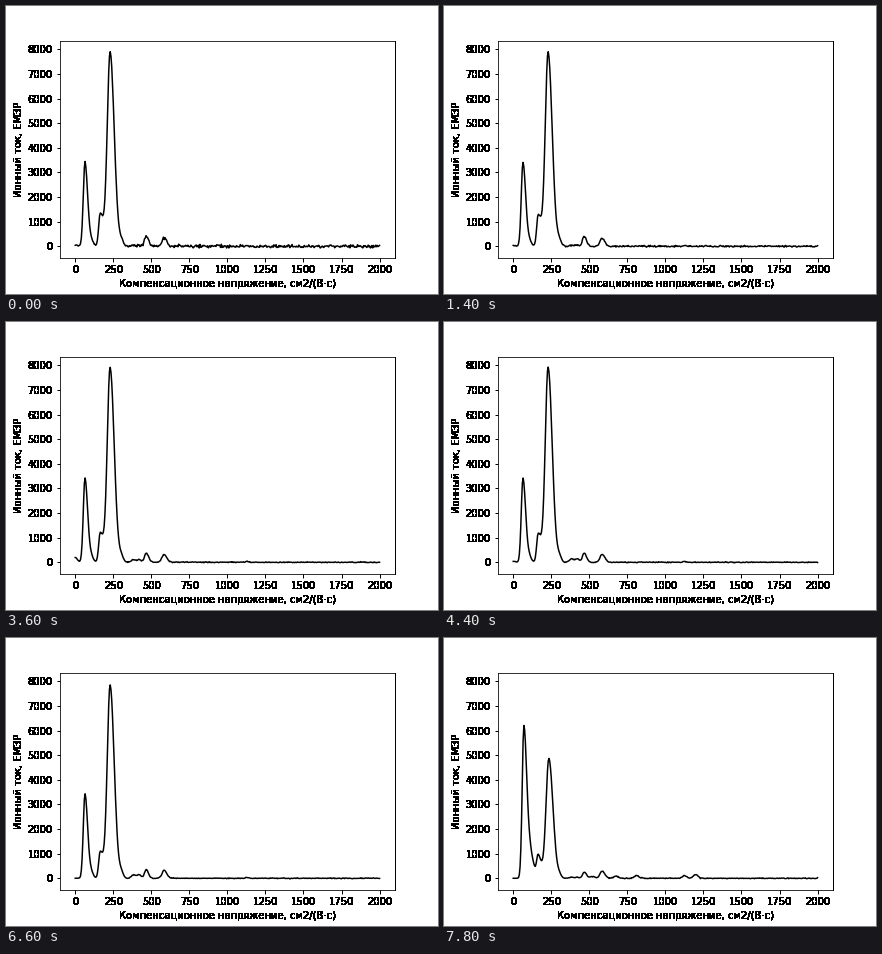
These frames come from a looping animation (432x288 px, 8 s). A matplotlib script:

```python
import numpy as np
import matplotlib.pyplot as plt
from matplotlib.animation import FuncAnimation

FRAMES, STEP = 40, 200
SWAP = 33  # the first peak starts to overtake the main one here

x = np.linspace(0, 2000, 401)


def bump(height, center, left, right=None):
    """Gaussian peak with separate widths on each side."""
    width = np.where(x < center, left, right or left)
    return height * np.exp(-0.5 * ((x - center) / width) ** 2)


def mix(a, b, s):
    return a + (b - a) * s


def pulse(i, center, width):
    return np.exp(-((i - center) / width) ** 2)


def spectrum(i):
    s = (max(i - SWAP, 0) / (FRAMES - 1 - SWAP)) ** 1.2
    main = 7890 - i + 70 * pulse(i, 21, 5)
    plateau = mix(45 + 95 / (1 + np.exp((17 - i) / 1.5)), 40, s)
    start = 55 * np.exp(-i / 15) + 180 * pulse(i, 18, 3)

    # first peak with its tail, then the shoulder of the main peak
    y = bump(mix(3420, 6200, s), mix(64, 70, s), 11, mix(17, 20, s))
    y += bump(mix(250, 850, s), mix(103, 115, s), 15, mix(15, 22, s))
    y += bump((1330 - 7.5 * i) * (1 - 0.12 * s), 164, 10, 21)
    y += bump(mix(main, 4870, s), mix(229, 234, s), 18.7, 27)
    y += bump(mix(220, 120, s), 303, 13)

    # small peaks
    y += bump(plateau, 384, 14) + bump(plateau, 421, 13)
    y += bump((430 - 2.2 * i) * (1 - 0.3 * s), 466, 11, 15)
    y += bump(mix(320, 290, s), 584, 14, 18)
    y += bump(start, 0, 14) + bump(35, 1127, 10)
    for height, center in [(70, 523), (90, 675), (110, 811), (75, 1127), (150, 1198)]:
        y += bump(height * s, center, 15)

    # noise fades as the measurement settles, and is weaker under the peaks
    rng = np.random.default_rng(100 + i)
    level = (8 + 25 * np.exp(-i / 7)) * np.where(x < 330, 0.4, 1)
    return y + np.clip(level * rng.normal(0, 1, x.size), -70, 110)


def harden(img, dpi):
    """Make every touched pixel of the text solid."""
    img = img.copy()
    img[..., 3] = img[..., 3] > 0
    return img, 0, 0


plt.rcParams["font.family"] = "DejaVu Sans"
fig, ax = plt.subplots(figsize=(6, 4), dpi=72, facecolor="white")
fig.subplots_adjust(left=0.125, right=0.9, bottom=0.125, top=0.88)
ax.set_xlim(-100, 2100)
ax.set_ylim(-476, 8362)
ax.set_xticks(range(0, 2001, 250))
ax.set_yticks(range(0, 8001, 1000))
ax.tick_params(width=1)
ax.tick_params(axis="y", pad=3.8)
ax.spines["right"].set_linewidth(1)

labels = [ax.set_xlabel("Компенсационное напряжение, см2/(В·с)"),
          ax.set_ylabel("Ионный ток, ЕМЗР")]
for text in labels + ax.get_xticklabels() + ax.get_yticklabels():
    text.set_agg_filter(harden)

line, = ax.plot(x, spectrum(0), color="black", lw=1.5)


def update(i):
    line.set_ydata(spectrum(i))
    return line,


anim = FuncAnimation(fig, update, frames=FRAMES, interval=STEP,
                     repeat=True, repeat_delay=0, blit=False)
plt.show()
```
